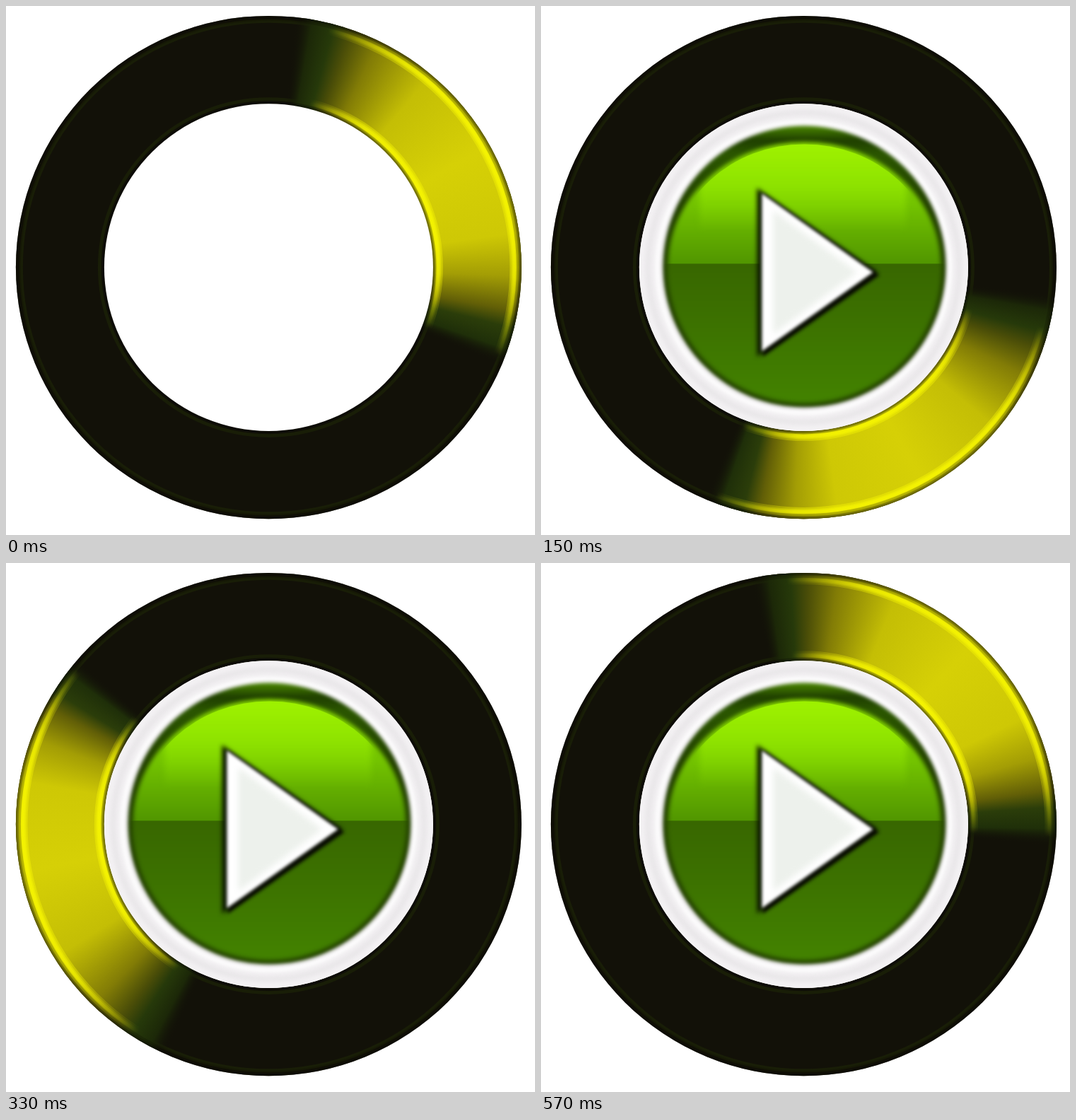
Recreate the animation shown at these times as an HTML page with a canvas. Size 748 by 748 pixels, loop 600 ms.

```html
<!DOCTYPE html>
<html>
<head>
<meta charset="utf-8">
<title>Play button</title>
<style>
html, body { margin: 0; width: 100%; height: 100%; overflow: hidden; background: #fff; }
canvas { display: block; }
</style>
</head>
<body>
<canvas id="stage" width="748" height="748"></canvas>
<script>
const ctx = document.getElementById('stage').getContext('2d');
const TAU = Math.PI * 2, STEP = 30, STEPS = 20;
const OUTER = 357.5, INNER = 232.5, SPLIT = -4;
const DARK = '#121108';

// Colours along the light, in degrees clockwise from its tail
const light = [[0, DARK], [4, '#1c2808'], [9, '#26390a'], [13, '#4a4d08'], [20, '#827c06'],
  [34, '#c4be05'], [55, '#d6d006'], [76, '#cec805'], [86, '#a39d05'], [94, '#625f07'],
  [98, '#2b3d0a'], [103, '#1f2f09'], [107, DARK]];
const glint = [[8, '#ff00'], [28, '#ff0'], [86, '#ff0'], [105, '#ff00']];

function sweep(stops, start) {
  const g = ctx.createConicGradient((start - 90) * TAU / 360, 0, 0);
  for (const [deg, color] of stops) g.addColorStop(deg / 360, color);
  return g;
}

function linear(y0, y1, stops) {
  const g = ctx.createLinearGradient(0, y0, 0, y1);
  for (const [at, color] of stops) g.addColorStop(at, color);
  return g;
}

function blurred(blur, draw) {
  ctx.filter = blur ? `blur(${blur}px)` : 'none';
  ctx.beginPath();
  draw();
  ctx.filter = 'none';
}

function disc(r, fill, blur = 0, y = 0, ry = r) {
  ctx.fillStyle = fill;
  blurred(blur, () => {
    ctx.ellipse(0, y, r, ry, 0, 0, TAU);
    ctx.fill();
  });
}

function hoop(r, width, stroke, alpha = 1, blur = 0) {
  ctx.globalAlpha = alpha;
  ctx.lineWidth = width;
  ctx.strokeStyle = stroke;
  blurred(blur, () => {
    ctx.arc(0, 0, r, 0, TAU);
    ctx.stroke();
  });
  ctx.globalAlpha = 1;
}

function triangle(x0, x1, half, fill, blur, y = 6) {
  ctx.fillStyle = fill;
  blurred(blur, () => {
    ctx.moveTo(x0, y - half);
    ctx.lineTo(x1, y);
    ctx.lineTo(x0, y + half);
    ctx.fill();
  });
}

function clipped(addShape, draw) {
  ctx.save();
  ctx.beginPath();
  addShape();
  ctx.clip();
  draw();
  ctx.restore();
}

function drawRing(start) {
  disc(OUTER, DARK);
  for (const r of [350, 239]) hoop(r, 5, '#1f2707', 0.6);
  disc(OUTER, sweep(light.map(([d, c]) => [d, c === DARK ? '#12110800' : c]), start));
  const shine = sweep(glint, start);
  for (const r of [347.5, 240]) {
    for (const width of [13, 8, 4]) hoop(r, width, shine, 0.36);
  }
  clipped(() => ctx.arc(0, 0, OUTER, 0, TAU), () => {
    for (const width of [14, 8, 4]) hoop(OUTER, width, '#0a0a04', 0.22);
  });
  for (const width of [9, 5]) hoop(INNER, width, '#0a0a04', 0.28);
  disc(INNER, '#fff');
}

function drawButton() {
  disc(INNER, '#f4f2f4');
  hoop(220, 9, '#e6e4e7', 0.8, 3);
  hoop(207, 5, '#fff', 0.8, 2);

  ctx.translate(1, -1);
  disc(200, linear(-200, 200, [[0, '#4a8600'], [0.05, '#1f3f00'], [0.1, '#2b5600'], [0.3, '#223f00'], [1, '#223f00']]), 2.5);

  // Glossy upper half over a darker lower half
  clipped(() => ctx.rect(-210, -210, 420, 210 + SPLIT), () => {
    disc(193, linear(-178, SPLIT, [[0, '#8fe000'], [0.5, '#74c400'], [1, '#519600']]), 3, -1, 176);
    clipped(() => ctx.ellipse(0, -1, 188, 173, 0, 0, TAU), () => {
      ctx.fillStyle = linear(-175, -50, [[0, '#9ff200'], [0.5, '#93e800c0'], [1, '#8ade0000']]);
      blurred(4, () => ctx.fillRect(-148, -180, 292, 130));
    });
  });
  clipped(() => ctx.rect(-210, SPLIT, 420, 220), () => {
    disc(194, linear(SPLIT, 195, [[0, '#386700'], [0.4, '#3c7100'], [1, '#438300']]), 3);
  });
  ctx.translate(-1, 1);

  triangle(-66, 105, 120, '#0d1a00', 3, 7);
  triangle(-58, 107, 116, '#090d02', 2.5, 11);
  triangle(-59, 98, 112, '#fff', 2, 7);
  triangle(-43, 76, 88, '#edf1ec', 4, 7);
}

function frame(now) {
  const step = Math.floor(now / STEP) % STEPS;
  ctx.setTransform(1, 0, 0, 1, 0, 0);
  ctx.fillStyle = '#fff';
  ctx.fillRect(0, 0, 748, 748);
  ctx.setTransform(1, 0, 0, 0.995, 371.4, 369.6);
  drawRing(6 + step * 360 / STEPS);
  if (step > 0) drawButton();
}

function tick() {
  frame(performance.now());
  requestAnimationFrame(tick);
}
tick();
</script>
</body>
</html>
```
